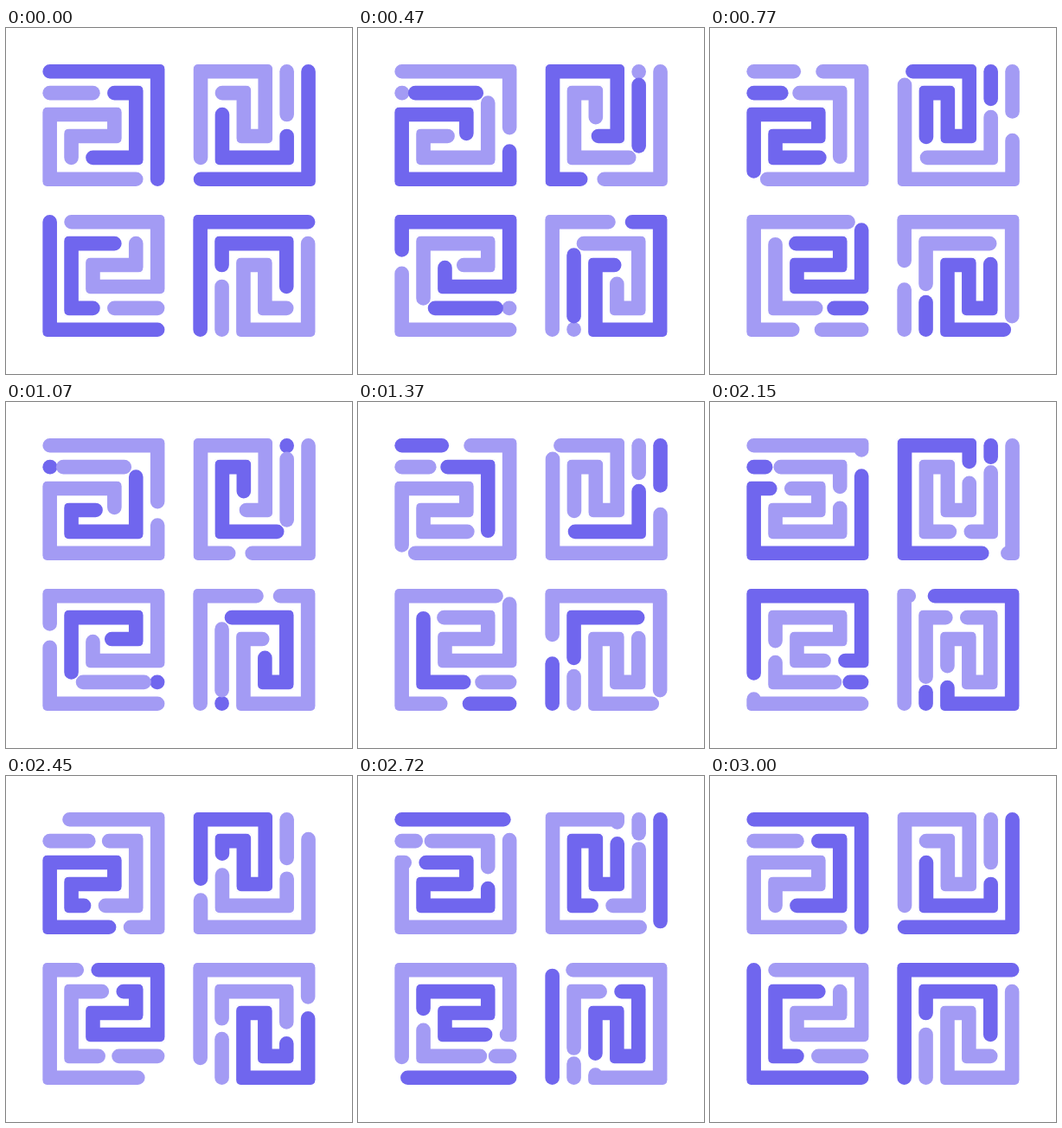
An HTML page with a canvas that plays this animation: 400 by 400 pixels, repeating every 4520 ms.

```html
<!DOCTYPE html>
<html lang="en">
<head>
<meta charset="utf-8">
<title>Maze tiles</title>
<style>
  html, body { margin: 0; width: 100%; height: 100%; overflow: hidden; background: #fff; }
  canvas { display: block; width: 400px; height: 400px; }
</style>
</head>
<body>
<canvas id="stage"></canvas>
<script>
const SIZE = 400, LOOP = 4520, MOVE = 3000, SLOT = 600, STEP = 25;
const DARK = '#7066ee', LIGHT = '#a39bf4';
const UNIT = 24.9, WIDTH = 16.6 / UNIT, CORNER = 5 / UNIT;

// The maze line on a 5 by 5 grid, 35 units long
const LINE = [[0, 0], [5, 0], [5, 5], [0, 5], [0, 2], [3, 2], [3, 3], [1, 3], [1, 4], [4, 4], [4, 1], [0, 1]];
const LENGTH = 35;

// Where a dash starts and ends on the line as it passes each slot
const STARTS = [0, 0, 11, 26, 33, 35.5];
const ENDS = [-1.5, 10, 25, 32, 35, 35];
const COLORS = [LIGHT, LIGHT, DARK, LIGHT, DARK];

const TILES = [
  { x: 112.9, y: 112.5, turn: 0 },
  { x: 287.3, y: 112.5, turn: 1 },
  { x: 112.9, y: 286.5, turn: 2 },
  { x: 286.9, y: 286.5, turn: 3 }
];

const canvas = document.getElementById('stage');
const ctx = canvas.getContext('2d');
const ratio = window.devicePixelRatio || 1;
canvas.width = canvas.height = SIZE * ratio;

const maze = new Path2D();
LINE.forEach(([x, y]) => maze.lineTo(x, y));
const nicks = cornerNicks();

// Slivers that soften the outer side of every bend
function cornerNicks() {
  const path = new Path2D();
  for (let i = 1; i < LINE.length - 1; i++) {
    const [x, y] = LINE[i];
    const [px, py] = LINE[i - 1];
    const [nx, ny] = LINE[i + 1];
    const sx = Math.sign(x - px || x - nx);
    const sy = Math.sign(y - py || y - ny);
    const reach = WIDTH / 2 + 0.02;
    const edge = WIDTH / 2;
    const at = (a, b) => [x + sx * a, y + sy * b];
    path.moveTo(...at(reach, reach));
    path.lineTo(...at(reach, edge - CORNER));
    path.lineTo(...at(edge, edge - CORNER));
    path.arcTo(...at(edge, edge), ...at(edge - CORNER, edge), CORNER);
    path.lineTo(...at(edge - CORNER, reach));
    path.closePath();
  }
  return path;
}

function along(stops, slot) {
  const i = Math.floor(slot);
  return stops[i] + (stops[i + 1] - stops[i]) * (slot - i);
}

function drawTile({ x, y, turn }, time) {
  const count = COLORS.length;
  ctx.save();
  ctx.translate(x, y);
  ctx.rotate(turn * Math.PI / 2);
  ctx.scale(UNIT, UNIT);
  ctx.translate(-2.5, -2.5);
  ctx.lineWidth = WIDTH;
  ctx.lineCap = 'round';
  ctx.lineJoin = 'miter';
  COLORS.forEach((color, i) => {
    const slot = (time / SLOT - i + count) % count;
    const start = along(STARTS, slot);
    const end = along(ENDS, slot);
    if (end <= 0 || start >= LENGTH) return;
    ctx.strokeStyle = color;
    ctx.setLineDash([end - start, 99]);
    ctx.lineDashOffset = -start;
    ctx.stroke(maze);
  });
  ctx.fillStyle = '#fff';
  ctx.fill(nicks);
  ctx.restore();
}

function draw(ms) {
  // Motion advances in 25 ms steps on a 10 ms clock, then rests
  const tick = Math.floor((ms % LOOP) / 10) * 10;
  const time = Math.min(Math.floor((tick + 5) / STEP) * STEP, MOVE);
  ctx.setTransform(ratio, 0, 0, ratio, 0, 0);
  ctx.fillStyle = '#fff';
  ctx.fillRect(0, 0, SIZE, SIZE);
  TILES.forEach(tile => drawTile(tile, time));
}

const begin = performance.now();
function frame() {
  draw(Math.max(0, performance.now() - begin));
  requestAnimationFrame(frame);
}
frame();
</script>
</body>
</html>
```
